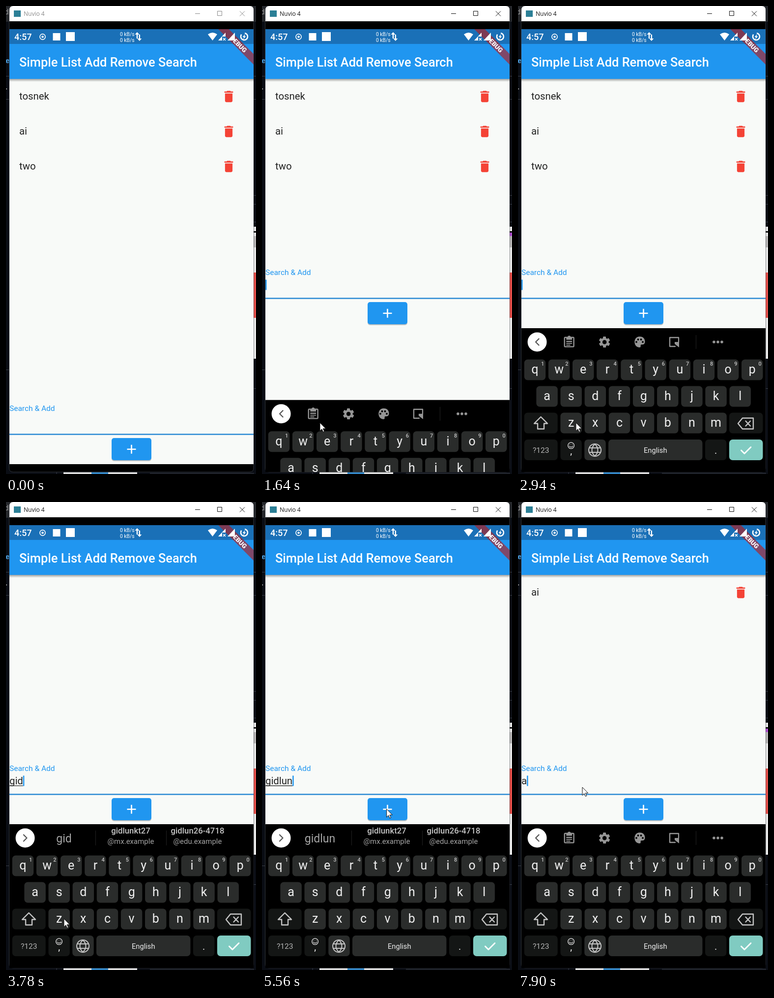
An HTML page for the animation above (8 s loop, 509 px wide and 950 px high).

```html
<!DOCTYPE html>
<html lang="en">
<head>
<meta charset="utf-8">
<title>Simple List Add Remove Search</title>
<style>
  html, body { margin: 0; width: 100%; height: 100%; overflow: hidden; background: #0a0d14; }
  svg { display: block; font-family: Roboto, sans-serif; }
  .mid { text-anchor: middle; }
  .line { fill: none; stroke-linecap: round; stroke-linejoin: round; }
</style>
</head>
<body>
<svg width="509" height="950" viewBox="0 0 509 950">
  <defs>
    <clipPath id="screen"><path d="M7 47H504V946H7Z"/></clipPath>
    <linearGradient id="shade" x2="0" y2="1">
      <stop stop-color="#000" stop-opacity=".35"/><stop offset="1" stop-color="#000" stop-opacity="0"/>
    </linearGradient>
    <path id="bin" d="M6 19c0 1.1.9 2 2 2h8c1.1 0 2-.9 2-2V7H6zM19 4h-3.5l-1-1h-5l-1 1H5v2h14z" fill="#f44336"/>
  </defs>

  <!-- desktop behind the window -->
  <path d="M0 0H509V32H0Z" fill="#26282c"/>
  <path d="M0 142.5H7M0 189.5H7M504 142.5H509M504 189.5H509M504 384.5H509M504 402.5H509M504 438.5H509M504 776.5H509M0 738.5H7M103 946V950M293 948.5H505" stroke="#3b3f48"/>
  <g font-size="15" fill="#999"><text x="-3" y="17">d/</text><text x="-1" y="116" font-weight="700" fill="#4b9bd8">e</text><text x="-5" y="173">&gt;</text></g>
  <path d="M504 448H509V716H504Z" fill="#e8e8e8"/>
  <path d="M504 457H509V460H504Z" fill="#111"/>
  <path d="M504 467H509V490H504Z" fill="#b8b6b6"/>
  <path d="M504 541H509V633H504Z" fill="#e5504b"/>
  <path id="accent" d="M504 460H509V467H504Z" fill="#b04fd0"/>
  <path d="M117 946H267V950H117Z" fill="#ddd"/>
  <path d="M174 946H208V950H174Z" fill="#3488c8"/>

  <!-- window frame -->
  <path d="M6.500 8V938q0 8 8 8H496q8 0 8-8V8Z" fill="#000" stroke="#30343a"/>
  <path d="M7 31V8q0-8 8-8H496q8 0 8 8V31Z" fill="#fff"/>
  <rect x="16" y="9" width="14" height="13" fill="#2b7f96"/>
  <g id="chrome">
    <text x="36" y="20" font-size="12" font-family="Open Sans, sans-serif">Nuvio 4</text>
    <path d="M385 15.500H395M430.500 10.500H439.500V19.500H430.500ZM476 10.500L486 20.500M486 10.500L476 20.500" fill="none" stroke="currentColor"/>
  </g>

  <g clip-path="url(#screen)">
    <path d="M7 77H504V930H7Z" fill="#f8faf8"/>
    <path d="M7 148H504V154H7Z" fill="url(#shade)"/>
    <path d="M7 77H504V148H7Z" fill="#2096f0"/>
    <path d="M7 47H504V77H7Z" fill="#1a70b7"/>
    <text x="27" y="122.500" font-size="25.400" font-weight="500" fill="#fff">Simple List Add Remove Search</text>
    <g transform="translate(504 47) rotate(45) scale(1.268)">
      <path d="M-40 28H40V40H-40Z" fill="#b71c1c" opacity=".63"/>
      <text class="mid" y="37.600" font-size="10.200" font-weight="900" fill="#fff">DEBUG</text>
    </g>

    <!-- status bar -->
    <g fill="#fff">
      <text x="17" y="69" font-size="18" font-weight="500">4:57</text>
      <circle cx="74.500" cy="62.500" r="5.600" fill="none" stroke="#fff" stroke-width="1.600"/>
      <circle cx="74.500" cy="62.500" r="2.300"/>
      <rect x="95.500" y="55" width="15" height="15"/>
      <rect x="122" y="53" width="18" height="18"/>
      <g font-size="10.300"><text x="232" y="60.500">0 kB/s</text><text x="232" y="72.500">0 kB/s</text></g>
      <path d="M267 53L271.500 58H268.200V66H265.800V58H262.500ZM271.800 71L267.300 66H270.600V58H273V66H276.300Z"/>
      <path d="M411 57.500Q420.500 50.500 430 57.500L420.500 70Z"/>
      <path d="M447 54V62H440V70H432ZM466 54V70H451Z"/>
      <path d="M442 65L447 70M447 65L442 70" stroke="#fff" stroke-width="1.500"/>
      <circle cx="485" cy="62" r="7" fill="none" stroke="#fff" stroke-width="2.600" stroke-dasharray="36 8" transform="rotate(-80 485 62)"/>
      <path d="M487 57L481.500 63H484.500L483 67.500L488.500 61.500H485.500Z"/>
    </g>

    <g id="rows"></g>

    <!-- input and add button -->
    <g id="form">
      <text x="7" y="822" font-size="15.500" fill="#2096f0">Search &amp; Add</text>
      <text id="input" x="7" y="849" font-size="20.300" fill="#222"></text>
      <path id="composing" stroke="#333" stroke-width="1.300"/>
      <rect id="caret" y="831.500" width="2.500" height="21" fill="#2096f0"/>
      <path d="M7 869.500H504" stroke="#2c8ad4" stroke-width="2.600"/>
      <rect x="215" y="879" width="81" height="45" rx="5" opacity=".22"/>
      <rect id="button" x="215" y="877" width="81" height="45" rx="5"/>
      <path d="M246.500 899.700H264.500M255.500 890.700V908.700" stroke="#fff" stroke-width="2.600"/>
    </g>

    <g id="keyboard">
      <path d="M7 654H504V946H7Z"/>
      <circle cx="39" cy="682" r="19.500" fill="#fff"/>
      <path id="chevron" class="line" d="M42.500 675.500L36 682L42.500 688.500" stroke="#555" stroke-width="2.300"/>
      <g id="tools" fill="#969696">
        <path transform="translate(90 668) scale(1.180)" d="M19 3h-4.200a3 3 0 0 0-5.600 0H5q-2 0-2 2v14q0 2 2 2h14q2 0 2-2V5q0-2-2-2zM19 19H5V5h2v3h10V5h2zM7 10h10v2H7zM7 13.500h10v1.500H7zM7 16.500h7v1.500H7z"/>
        <path transform="translate(162 668) scale(1.180)" d="M19.100 12.900c0-.3.100-.6.100-.9s0-.6-.1-.9l2-1.600c.2-.1.200-.4.100-.6l-1.900-3.300c-.1-.2-.4-.3-.6-.2l-2.400 1c-.5-.4-1-.7-1.600-.9l-.4-2.600c0-.2-.2-.4-.5-.4h-3.800c-.2 0-.4.200-.5.400l-.4 2.600c-.6.200-1.100.5-1.600.9l-2.400-1c-.2-.1-.5 0-.6.200L2.700 8.900c-.1.200-.1.500.1.600l2 1.600v1.800l-2 1.600c-.2.100-.2.400-.1.600l1.900 3.300c.1.200.4.300.6.200l2.400-1c.5.400 1 .7 1.600.9l.4 2.600c0 .2.200.4.500.4h3.800c.2 0 .4-.2.500-.4l.4-2.600c.6-.2 1.100-.5 1.600-.9l2.400 1c.2.100.5 0 .6-.2l1.900-3.300c.1-.2.100-.5-.1-.6zM12 15.600a3.600 3.600 0 1 1 0-7.200 3.600 3.600 0 0 1 0 7.200z"/>
        <path d="M247.500 671C234 671 234 693 247.500 693C251 693 249 689 250 688C251 686 258 690 258.500 681Q257.500 671 247.500 671Z"/>
        <g fill="#000"><circle cx="241" cy="682" r="1.900"/><circle cx="244.500" cy="677" r="1.900"/><circle cx="250.500" cy="677" r="1.900"/><circle cx="254" cy="682" r="1.900"/></g>
        <path d="M320 691H309V673H327V682" class="line" stroke="#969696" stroke-width="2.300"/>
        <path d="M319 682H328V693L319 686Z"/>
        <path d="M362.500 668V696" stroke="#222"/>
        <circle cx="399" cy="682" r="2.800"/><circle cx="407" cy="682" r="2.800"/><circle cx="415" cy="682" r="2.800"/>
      </g>
      <g id="hints" class="mid" fill="#a5a5a5">
        <text id="word" x="118" y="691" font-size="23"></text>
        <path d="M182.500 667V697M326.500 667V697" stroke="#222"/>
        <g id="mails" font-size="15">
          <text x="254" y="673" font-size="16.800" font-weight="500" fill="#c4c4c4">gidlunkt27</text><text x="254" y="694">@mx.example</text>
          <text x="390" y="673" font-size="16.800" font-weight="500" fill="#c4c4c4">gidlun26-4718</text><text x="390" y="694">@edu.example</text>
        </g>
      </g>
      <g id="keys" class="mid"></g>
      <g class="line" stroke="#c4c4c4" stroke-width="2.400">
        <path d="M46.500 834L60 847.500H53V858.500H40V847.500H33Z"/>
        <path d="M457 836.500H479V858.500H457L448 847.500ZM463.500 842.500L473 852.500M473 842.500L463.500 852.500"/>
        <path d="M156.500 889a12.500 12.500 0 1 0 .1 0ZM156.500 889q-12 12.500 0 25M156.500 889q12 12.500 0 25M145 897H168M145 906H168" stroke-width="2"/>
        <path d="M108 886a6.300 6.300 0 1 0 .1 0ZM104.500 893.500q3.500 4 7 0M105.800 890.500v.1M110.200 890.500v.1" stroke-width="1.500"/>
        <path d="M454.500 902L461 908.500L474 895.500" stroke="#fff" stroke-width="2.800"/>
      </g>
    </g>
  </g>
  <path id="pointer" d="M0 0V16.500L3.800 12.800L6.400 18.600L8.800 17.500L6.300 11.900H11.700Z" fill="#fff" stroke="#111"/>
</svg>
<script>
const LOOP = 8000, NAME = 'gidlun';
const TYPE_AT = 3150, TYPE_STEP = 220, ADD_AT = 6190, LETTER_AT = 7830;
const $ = id => document.getElementById(id);
const show = (id, on) => $(id).style.display = on ? '' : 'none';
const move = (id, x, y) => $(id).setAttribute('transform', `translate(${x} ${y})`);

function key(x, y, w, label = '', { fill = '#2a2c2b', size = 25, ink = '#f0f0f0', base = 28.5 } = {}) {
  return `<rect x="${x}" y="${y}" width="${w}" height="42" rx="7" fill="${fill}"/>
    <text x="${x + w / 2}" y="${y + base}" font-size="${size}" fill="${ink}">${label}</text>`;
}

function buildKeys() {
  const dark = '#141615', pitch = 49.15;
  let out = '';
  [['qwertyuiop', 12.7], ['asdfghjkl', 37.3], ['zxcvbnm', 86.4]].forEach(([letters, left], row) => {
    [...letters].forEach((c, i) => {
      const x = left + i * pitch, y = 717.5 + row * 54;
      out += key(x, y, 43.5, c);
      if (!row) out += `<text x="${x + 37.5}" y="${y + 12.5}" font-size="11" font-weight="500" fill="#c4c4c4">${(i + 1) % 10}</text>`;
    });
  });
  const y = 880;
  out += key(12.7, 825.5, 68, '', { fill: dark }) + key(430, 825.5, 68.5, '', { fill: dark });
  out += key(12.7, y, 68, '?123', { fill: dark, size: 15.5, ink: '#b5b5b5', base: 27 });
  out += key(86.4, y, 43.5, ',', { fill: dark, size: 20, base: 30 });
  out += key(135.2, y, 43.5);
  out += key(184, y, 191.5, 'English', { size: 14.7, base: 27 });
  out += key(381, y, 43.5, '.', { fill: dark, size: 20 });
  out += key(430, y, 68.5, '', { fill: '#80cbc1' });
  $('keys').innerHTML = out;
}

function buildRows() {
  $('rows').innerHTML = [0, 1, 2, 3].map(i => `<g id="row${i}" transform="translate(0 ${i * 71})">
    <text x="27" y="190" font-size="20.300" fill="#222"></text>
    <use href="#bin" transform="translate(438.300 168.500) scale(1.268)"/></g>`).join('');
}

// time, x, y of the pointer
const PATH = [[460, 512, 140], [600, 448, 176], [1000, 256, 862], [1220, 118, 846], [4650, 118, 846],
  [5150, 238, 590], [5600, 254, 624], [6230, 254, 624], [6400, 320, 535], [6900, 320, 535], [7300, 168, 586], [7550, 131, 579], [LOOP, 131, 579]];

function pointerAt(t) {
  const i = Math.max(1, PATH.findIndex(p => p[0] > t));
  const [t0, x0, y0] = PATH[i - 1], [t1, x1, y1] = PATH[i];
  const u = Math.max(0, (t - t0) / (t1 - t0)), k = u * u * (3 - 2 * u);
  return [x0 + (x1 - x0) * k, y0 + (y1 - y0) * k];
}

const typedAt = t => t >= ADD_AT ? (t >= LETTER_AT ? 'a' : '')
  : NAME.slice(0, Math.max(0, Math.floor((t - TYPE_AT) / TYPE_STEP) + 1));

function blinkStart(t) {
  if (t >= LETTER_AT) return LETTER_AT;
  if (t >= ADD_AT) return ADD_AT;
  if (t < TYPE_AT) return 460;
  return TYPE_AT + TYPE_STEP * Math.min(NAME.length - 1, Math.floor((t - TYPE_AT) / TYPE_STEP));
}

function draw(t) {
  const text = typedAt(t), active = t >= 1150;
  $('chrome').style.fill = $('chrome').style.color = active ? '#111' : '#8a8a8a';
  show('accent', active && t < 2900 || t > 6000);

  const items = ['tosnek', 'ai', 'two', ...(t >= ADD_AT ? [NAME] : [])].filter(s => s.includes(text));
  for (let i = 0; i < 4; i++) {
    show('row' + i, i < items.length);
    $('row' + i).firstElementChild.textContent = items[i] || '';
  }

  move('form', 0, t >= 1640 ? -276 : 0);
  $('input').textContent = text;
  const end = 7 + (text ? $('input').getComputedTextLength() : 0);
  $('composing').setAttribute('d', text.length > 1 ? `M7 852H${end}` : '');
  $('caret').setAttribute('x', end);
  show('caret', t >= 460 && (t - blinkStart(t)) % 1000 < 500);
  $('button').setAttribute('fill', t >= ADD_AT && t < 6620 ? '#42a5f3' : '#2096f0');

  const rise = Math.min(1, Math.max(0, (t - 1580) / 290));
  show('keyboard', rise > 0);
  move('keyboard', 0, 296 * (1 - rise) ** 3);
  const hint = t < ADD_AT + 70 ? typedAt(Math.min(t, ADD_AT - 1) - 150) : '';
  show('tools', !hint);
  show('hints', hint);
  show('mails', hint.length > 2);
  $('word').textContent = hint;
  $('chevron').setAttribute('transform', hint ? 'rotate(180 39.200 682)' : '');

  show('pointer', t >= 460);
  move('pointer', ...pointerAt(t));
}

function tick() {
  draw(performance.now() % LOOP);
  requestAnimationFrame(tick);
}

buildKeys();
buildRows();
tick();
</script>
</body>
</html>
```
